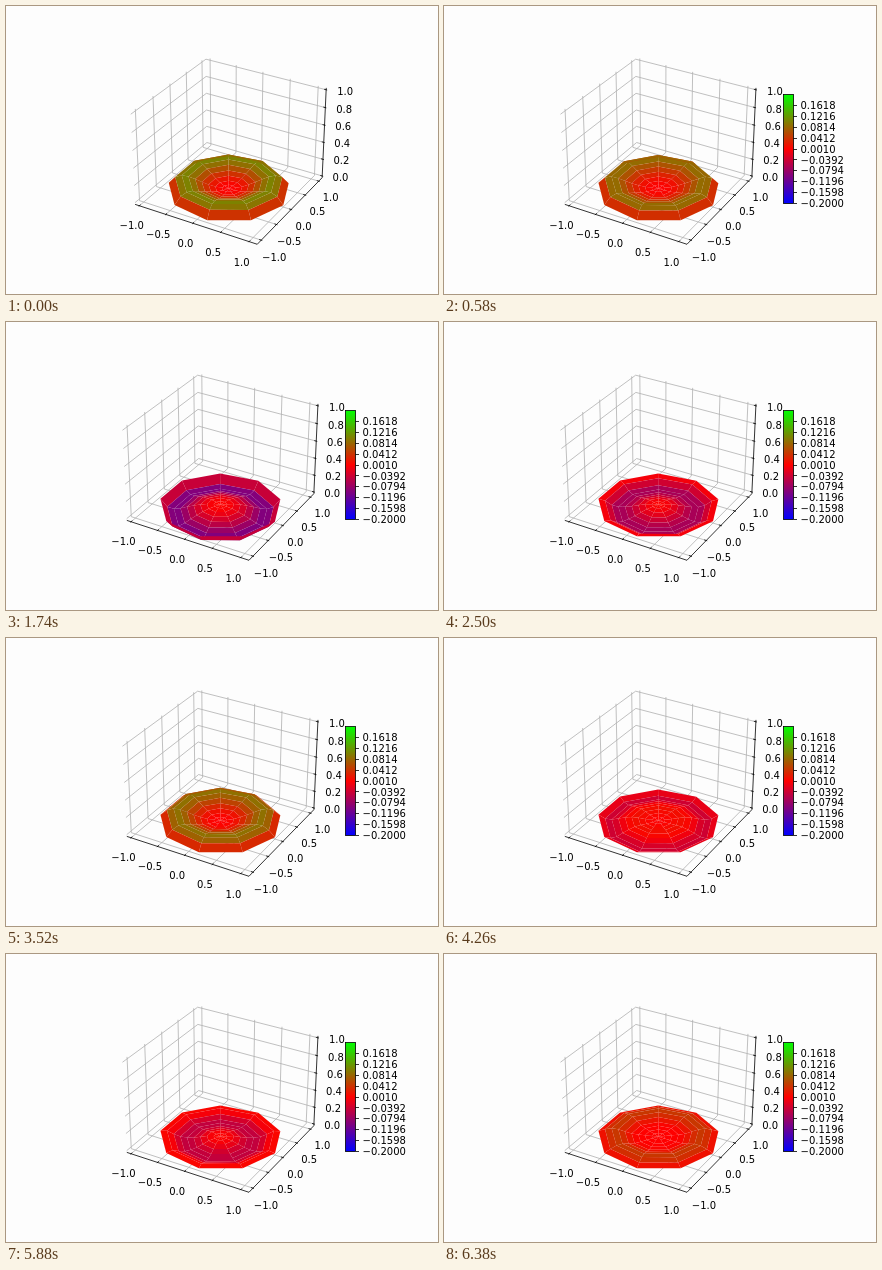
An HTML page with a canvas that plays this animation: 432 by 288 pixels, repeating every 6.4 s.

```html
<!DOCTYPE html>
<html lang="en">
<head>
<meta charset="utf-8">
<title>Vibrating membrane</title>
<style>
  html, body { margin: 0; width: 100%; height: 100%; overflow: hidden; background: #fdfdfd; }
  svg, canvas { position: absolute; left: 0; top: 0; }
  text { font: 10px "DejaVu Sans", sans-serif; }
</style>
</head>
<body>
<svg id="plot" width="432" height="288" viewBox="0 0 432 288">
  <defs>
    <linearGradient id="scale" x1="0" y1="1" x2="0" y2="0">
      <stop offset="0" stop-color="#00f"/>
      <stop offset=".5" stop-color="#f00"/>
      <stop offset="1" stop-color="#0f0"/>
    </linearGradient>
  </defs>
  <g id="axes"></g>
  <g id="bar"></g>
</svg>
<canvas id="surface" width="432" height="288"></canvas>
<script>
const LOOP = 6400, STEP = 20;
const RINGS = 9, SIDES = 9;
const WIDE_SHIFT = 8.28; // axes sit further right before the colour bar appears
const axes = document.getElementById('axes');
const bar = document.getElementById('bar');
const ctx = document.getElementById('surface').getContext('2d');

// Perspective view: elevation 30, azimuth -60, box 4:4:3, coordinates in -0.5..0.5
const C30 = Math.sqrt(3) / 2;
function project(nx, ny, nz) {
  const x = nx * 8 / 7, y = ny * 8 / 7, z = nz * 6 / 7;
  const depth = 0.433 * x - 0.75 * y + 0.5 * z;
  const s = 117.535 / (1 - depth / 10);
  return [
    216.06 + s * (C30 * x + 0.5 * y),
    140.34 - s * (-0.25 * x + 0.433 * y + C30 * z),
    depth
  ];
}
const MID_X = 0.03015, SPAN_X = 2.1337, SPAN_Y = 2.1666;
const normX = x => (x - MID_X) / SPAN_X;
const normY = y => y / SPAN_Y;
const normZ = z => z - 0.5;

function add(parent, tag, attrs, text) {
  const el = document.createElementNS('http://www.w3.org/2000/svg', tag);
  for (const k in attrs) el.setAttribute(k, attrs[k]);
  if (text) el.textContent = text;
  parent.append(el);
}
function line(parent, pts, stroke) {
  const points = pts.map(p => p[0].toFixed(2) + ',' + p[1].toFixed(2)).join(' ');
  add(parent, 'polyline', { points, fill: 'none', stroke, 'stroke-width': 0.8 });
}
const line3 = (pts, stroke) => line(axes, pts.map(p => project(...p)), stroke);
const label = (v, digits) => v.toFixed(digits).replace('-', '\u2212');

function buildAxes() {
  const E = 0.5 + 1 / 48, OUT = 1 / 120, IN = 1 / 60, L = E + 0.1058;
  const half = [-1, -0.5, 0, 0.5, 1];
  const fifth = [0, 0.2, 0.4, 0.6, 0.8, 1];
  const sets = [
    { ticks: half, norm: normX,
      grid: n => [[n, -E, -E], [n, E, -E], [n, E, E]],
      tick: n => [[n, -E - OUT, -E], [n, -E + IN, -E]],
      text: n => [n, -L, -L],
      edge: [[-E, -E, -E], [E, -E, -E]] },
    { ticks: half, norm: normY,
      grid: n => [[E, n, -E], [-E, n, -E], [-E, n, E]],
      tick: n => [[E + OUT, n, -E], [E - IN, n, -E]],
      text: n => [L, n, -L],
      edge: [[E, -E, -E], [E, E, -E]] },
    { ticks: fifth, norm: normZ,
      grid: n => [[-E, -E, n], [-E, E, n], [E, E, n]],
      tick: n => [[E + OUT, E, n], [E - IN, E, n]],
      text: n => [L, L, n],
      edge: [[E, E, -E], [E, E, E]] }
  ];
  for (const s of sets) for (const v of s.ticks) line3(s.grid(s.norm(v)), '#b0b0b0');
  for (const s of sets) {
    line3(s.edge, '#000');
    for (const v of s.ticks) {
      const n = s.norm(v), [x, y] = project(...s.text(n));
      line3(s.tick(n), '#000');
      add(axes, 'text', { x: x.toFixed(1), y: Math.round(y + 7.6), 'text-anchor': 'middle' }, label(v, 1));
    }
  }
}

function buildBar() {
  add(bar, 'rect', { x: 339.5, y: 88.5, width: 10, height: 109,
    fill: 'url(#scale)', stroke: '#000', 'stroke-width': 0.8 });
  for (let k = 0; k < 10; k++) {
    const y = 197.64 - k * 0.0402 / 0.4 * 108.72;
    const ty = Math.floor(y) + 0.5;
    line(bar, [[349.5, ty], [353, ty]], '#000');
    add(bar, 'text', { x: 356.5, y: Math.round(y + 3.6) }, label(-0.2 + k * 0.0402, 4));
  }
}

// Smooth curve through (xs, ys)
function spline(xs, ys, x) {
  const last = xs.length - 1;
  let i = 0;
  while (i < last - 1 && x > xs[i + 1]) i++;
  const slope = k => {
    const a = Math.max(k - 1, 0), b = Math.min(k + 1, last);
    return (ys[b] - ys[a]) / (xs[b] - xs[a]);
  };
  const h = xs[i + 1] - xs[i], p = (x - xs[i]) / h, q = 1 - p;
  return ys[i] * (1 + 2 * p) * q * q + slope(i) * h * p * q * q
       + ys[i + 1] * (3 - 2 * p) * p * p - slope(i + 1) * h * p * p * q;
}

// Time, then heights in thousandths at the radial nodes 2, 4, 6, 7, 8 of 9
const NODES = [0, 2, 4, 6, 7, 8, 9];
const POSES = [
  [0, 8, 49, 99, 105, 78],
  [680, 5, 30, 68, 84, 66],
  [1100, 0, 1, 2, 1, 0],
  [1400, -4, -20, -50, -70, -62],
  [1800, -8, -45, -95, -108, -88],
  [2150, -10, -55, -100, -100, -65],
  [2500, -12, -50, -72, -60, -15],
  [2900, -5, -15, 0, 30, 35],
  [3250, 3, 15, 65, 85, 68],
  [3520, 5, 40, 85, 90, 62],
  [3950, 8, 35, 35, 15, 0],
  [4400, 2, 0, -40, -60, -46],
  [4880, -4, -22, -58, -82, -46],
  [5350, -8, -38, -62, -52, -10],
  [5880, -8, -44, -46, -22, 8],
  [6100, -5, -20, -10, 12, 18],
  [6380, 0, 6, 42, 45, 25]
];
const TIMES = POSES.map(p => p[0]);

function profile(t) {
  const at = k => spline(TIMES, POSES.map(p => p[k] / 1000), t);
  const heights = [0, at(1), at(2), at(3), at(4), at(5), 0];
  return Array.from({ length: RINGS + 1 }, (_, i) => spline(NODES, heights, i));
}

function colour(v) {
  const c = Math.max(-1, Math.min(1, v / 0.2)), b = n => Math.round(255 * n);
  return `rgb(${b(1 - Math.abs(c))},${b(Math.max(c, 0))},${b(Math.max(-c, 0))})`;
}

function drawSurface(t, shift) {
  const u = profile(t), faces = [];
  const point = (i, j) => {
    const r = i / RINGS, a = j * 2 * Math.PI / SIDES;
    return project(normX(r * Math.cos(a)), normY(r * Math.sin(a)), normZ(u[i]));
  };
  for (let i = 0; i < RINGS; i++) {
    for (let j = 0; j < SIDES; j++) {
      const pts = [point(i, j), point(i + 1, j), point(i + 1, j + 1), point(i, j + 1)];
      const depth = pts.reduce((sum, p) => sum + p[2], 0);
      faces.push({ pts, depth, fill: colour((u[i] + u[i + 1]) / 2) });
    }
  }
  faces.sort((a, b) => a.depth - b.depth);
  ctx.setTransform(1, 0, 0, 1, 0, 0);
  ctx.clearRect(0, 0, 432, 288);
  ctx.translate(shift, 0);
  for (const f of faces) {
    ctx.beginPath();
    for (const p of f.pts) ctx.lineTo(p[0], p[1]);
    ctx.closePath();
    ctx.fillStyle = f.fill;
    ctx.fill();
  }
}

function render(ms) {
  const t = Math.floor((ms % LOOP) / STEP) * STEP;
  const shift = t === 0 ? WIDE_SHIFT : 0;
  axes.setAttribute('transform', `translate(${shift} 0)`);
  bar.setAttribute('visibility', shift ? 'hidden' : 'visible');
  drawSurface(t, shift);
}

buildAxes();
buildBar();
const start = performance.now();
function loop() {
  render(performance.now() - start);
  requestAnimationFrame(loop);
}
render(0);
requestAnimationFrame(loop);
</script>
</body>
</html>
```
